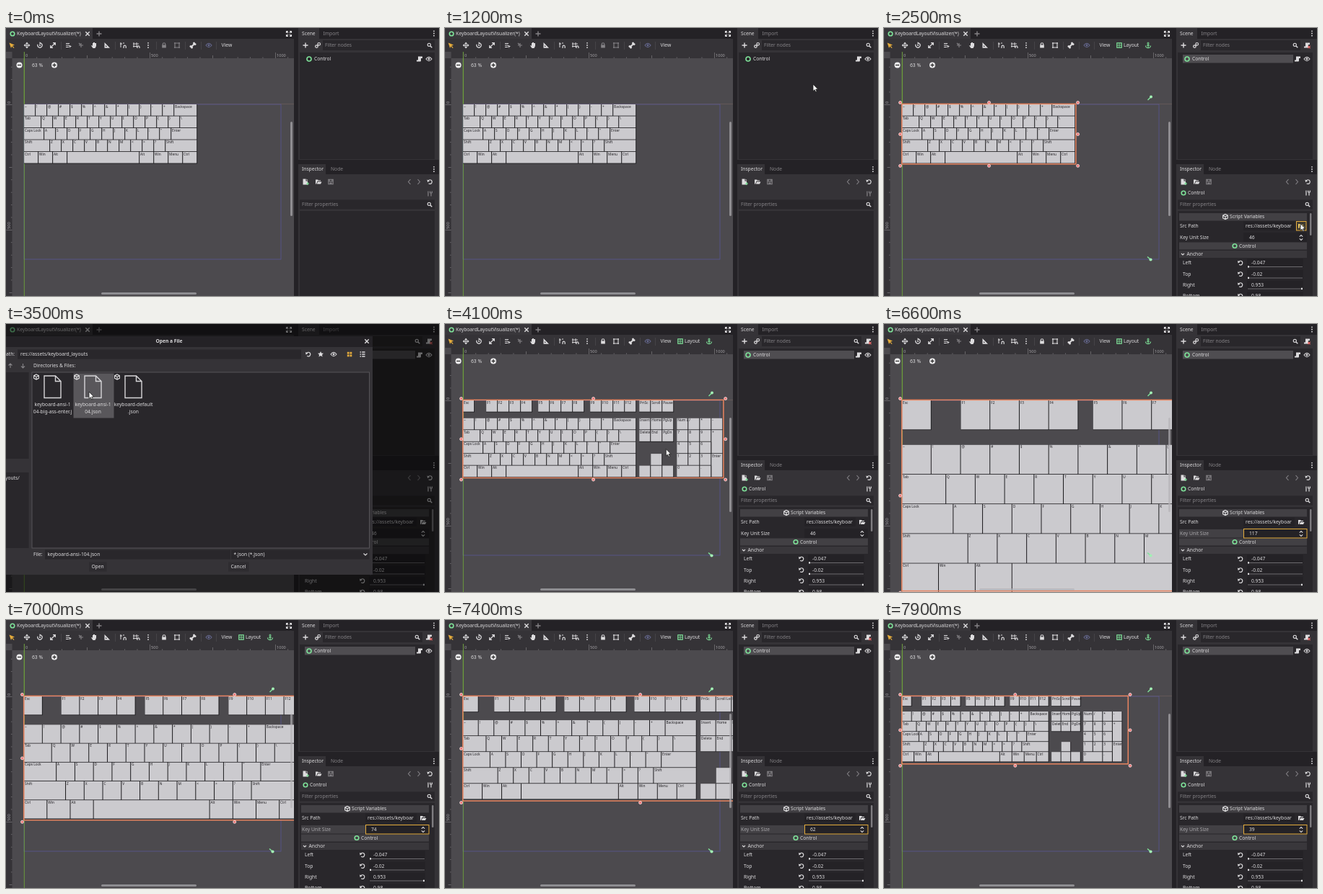
Write an HTML page that moves like this. It is 600 px wide and 372 px high and loops after 8 s.

```html
<!DOCTYPE html>
<html lang="en">
<head>
<meta charset="utf-8">
<title>Keyboard layout editor</title>
<style>
html, body { margin: 0; width: 100%; height: 100%; overflow: hidden; background: #353337; }
svg { display: block; }
text { font-family: "Noto Sans", "Open Sans", sans-serif; white-space: pre; }
</style>
</head>
<body>
<svg id="stage" width="600" height="372" viewBox="0 0 600 372"></svg>
<script>
const LOOP = 8000, STEP = 100;
const ZOOM = 0.348, OX = 25, OY = 106;
const BG = '#4c4a4e', PANEL = '#353337', DARK = '#29272b', STRIP = '#242226';
const INK = '#dddcde', DIM = '#858387', GREEN = '#7fe39a', AMBER = '#e3ab3c';

// SVG helpers
const esc = s => s.replace(/&/g, '&amp;').replace(/</g, '&lt;');
const rect = (x, y, w, h, fill, extra = '') =>
  `<rect x="${x}" y="${y}" width="${w}" height="${h}" fill="${fill}" ${extra}/>`;
const frame = (x, y, w, h, color, sw = 1) =>
  rect(x, y, w, h, 'none', `stroke="${color}" stroke-width="${sw}"`);
const text = (x, mid, s, fill = INK, extra = '', size = 6.7) =>
  `<text x="${x}" y="${mid + size * 0.36}" font-size="${size}" fill="${fill}" ${extra}>${esc(s)}</text>`;
const centered = (x, mid, s, extra = '') => text(x, mid, s, INK, 'text-anchor="middle" ' + extra);
const line = (d, color = INK, sw = 1.1, fill = 'none') =>
  `<path d="${d}" stroke="${color}" stroke-width="${sw}" fill="${fill}"/>`;
const solid = (d, color = INK) => `<path d="${d}" fill="${color}"/>`;
const dot = (x, y, r, fill, extra = '') => `<circle cx="${x}" cy="${y}" r="${r}" fill="${fill}" ${extra}/>`;
const ring = (x, y, r = 3, color = GREEN, sw = 1.6) =>
  dot(x, y, r, 'none', `stroke="${color}" stroke-width="${sw}"`);
const at = (x, y, body) => `<g transform="translate(${x} ${y})">${body}</g>`;

// Icons, centred on 0,0
const icon = {
  plus: (c = INK, r = 3.5) => line(`M${-r} 0H${r}M0 ${-r}V${r}`, c, 1.4),
  cross: (c = INK) => line('M-2.7 -2.7L2.7 2.7M2.7 -2.7L-2.7 2.7', c, 1.4),
  search: (c = INK) => ring(-.7, -.7, 2.1, c, 1.1) + line('M1 1L3.3 3.3', c, 1.4),
  eye: (c = INK) => line('M-4 0Q0 -5.5 4 0Q0 5.5 -4 0Z', c, 1.1) + dot(0, 0, 1.4, c),
  dots: (c = INK) => [-3.2, 0, 3.2].map(y => dot(0, y, .9, c)).join(''),
  script: (c = INK) => solid('M-2 -3.5H4V-1H2V2.5Q2 3.5 1 3.5H-4V1.5H-2Z', c),
  folder: (c = INK) => solid('M-4 -3H-1L0 -2H3V-1H-1.5L-3 3H-4ZM-1 0H4.5L3 3H-2.2Z', c),
  save: (c = INK) => line('M-3.2 -3.2H3.2V3.2H-3.2Z M-1.8 -3V-.5H1.8V-3', c, 1.1) + rect(-1.6, 1, 3.2, 2, c),
  newFile: () => solid('M-3.5 -4H.5V-1H3V4H-3.5Z') + solid('M1.5 -4L3.5 -2H1.5Z') + line('M1 2.5H5M3 .5V4.5', GREEN, 1.2),
  reset: (c = INK) => line('M-2.3 -1.6A2.8 2.8 0 1 1 -1.8 2.2', c, 1.2) + solid('M-4 -3L-3.4 .6L-.4 -1.2Z', c),
  tools: (c = INK) => line('M-2 -3.5V3.5M2 0V3.5M.7 -3.5V-1.5Q2 0 3.3 -1.5V-3.5', c, 1.2),
  box: (c = INK) => line('M0 -3.6L3.4 -1.8V1.8L0 3.6L-3.4 1.8V-1.8ZM-3.4 -1.8L0 0L3.4 -1.8M0 0V3.6', c, 1.1),
  lock: (c = INK) => rect(-2.8, -.5, 5.6, 4, c) + line('M-1.8 0V-1.5A1.8 1.8 0 0 1 1.8 -1.5V0', c),
  group: (c = INK) => line('M-2 -3H2M-2 3H2M-3 -2V2M3 -2V2', c) +
    [-3, 3].map(x => dot(x, -3, 1.1, c) + dot(x, 3, 1.1, c)).join(''),
  expand: () => line('M-3.5 -1V-3.5H-1M1 -3.5H3.5V-1M3.5 1V3.5H1M-1 3.5H-3.5V1M-3 -3L-1 -1M3 -3L1 -1M3 3L1 1M-3 3L-1 1'),
  spin: () => line('M-2.2 -1.4L0 -3.4L2.2 -1.4M-2.2 1.4L0 3.4L2.2 1.4', INK, 1.1)
};
const put = (name, x, y, color) => at(x, y, icon[name](color));

function toolbar() {
  const move = solid('M0 -4.5L2 -2H-2ZM0 4.5L2 2H-2ZM-4.5 0L-2 -2V2ZM4.5 0L2 -2V2Z') + line('M-3 0H3M0 -3V3');
  const hand = solid('M-2 -3H-1V-4H1V-3H3V1L1.5 4H-1.5L-4 .5L-3 0L-2 1Z');
  const list = line('M-4 -2.5H1M-4 0H0M-4 2.5H0', INK, 1.1) + solid('M0 -.5L4 1.5L2 2.2L1.5 4Z');
  const pivot = line('M-3 0H3M0 -3V3M-3 -3L-1 -1', DIM);
  const grid = line('M-3 -4V3M1 -4V3M-4 -2H4M-4 1.5H2', INK, .9) + line('M2 4V2.4A1.5 1.5 0 0 1 5 2.4V4', INK, 1.2);
  const smart = line('M-3 -4V3M-4 -2H-1M1 -4V-2', INK, 1) + line('M1 4V1.8A1.6 1.6 0 0 1 4.2 1.8V4', INK, 1.2);
  const bone = line('M-2 2L2 -2', INK, 2) + [[-3, 1.5], [-1.5, 3], [3, -1.5], [1.5, -3]].map(p => dot(...p, 1.5, INK)).join('');
  return at(8, 24, solid('M-3.5 -3.5L4 -.5L1 .7L3.5 3.2L2.6 4L.2 1.6L-1 4Z', AMBER)) +
    at(29, 24, move) +
    at(47, 24, line('M-3 -1.2A3.2 3.2 0 1 0 1 -3', INK, 1.3) + solid('M-.5 -4.8L2 -3L-.5 -1Z') + dot(0, 0, 1, INK)) +
    at(65, 24, line('M-3.3 0V3.3H0M0 -3.3H3.3V0M-3 3L3 -3', INK, 1.2)) +
    at(87, 24, list) + at(104, 24, pivot) + at(122, 24, hand) +
    at(140, 24, solid('M-3.5 -4L4 3.8H-3.5ZM-2 0V2H0Z').replace('<path', '<path fill-rule="evenodd"')) +
    at(162, 24, smart) + at(180, 24, grid) + put('dots', 197, 24) + at(259, 24, bone) +
    put('eye', 281, 24, '#65688f') +
    [76, 151, 208, 248, 270, 291].map(x => rect(x, 19, .8, 11, '#4a484c')).join('') +
    text(298.5, 24, 'View');
}

function rulers() {
  let s = rect(0, 33, 399, 9, PANEL) + rect(0, 42, 8.5, 330, PANEL) + rect(0, 33, 8.5, 9, BG);
  const unit = 50 * ZOOM;
  for (let i = -5; i < 22; i++) {
    const len = i % 10 === 0 ? 8 : i % 5 === 0 ? 4 : 1.6;
    const x = OX + i * unit, y = OY + i * unit;
    if (x > 8 && x < 399) s += rect(x, 42 - len, .7, len, '#7d7b7f');
    if (y > 42 && y < 372) s += rect(8.5 - len, y, len, .7, '#7d7b7f');
  }
  [0, 500, 1000].forEach(n => s += text(OX + 2 + n * ZOOM, 37.5, '' + n, '#a5a3a7', '', 5.6));
  [0, 500].forEach(n => s += at(4, OY - 1 + n * ZOOM, `<g transform="rotate(-90)">${text(0, 0, '' + n, '#a5a3a7', '', 5.6)}</g>`));
  return s;
}

function leftChrome() {
  return rect(0, 0, 399, 15, STRIP) + rect(0, 0, 120, 15.5, '#39373b') + rect(0, 15, 399, 18, PANEL) +
    ring(9, 8, 2.8) + text(15, 8, 'KeyboardLayoutVisualizer(*)') + put('cross', 113, 8) +
    put('plus', 129, 8, DIM) + put('expand', 392, 8) + toolbar() + rulers() +
    dot(18.5, 51.5, 4, '#efeef0') + line('M16 51.5H21', '#333', 1.3) + text(36, 51.5, '63 %') +
    dot(67, 51.5, 4, '#efeef0') + line('M64.5 51.5H69.5M67 49V54', '#333', 1.3) +
    rect(394, 130, 3, 131, '#b3b1b5', 'rx="1.5" opacity=".65"') +
    rect(132, 367, 132, 3, '#b3b1b5', 'rx="1.5" opacity=".65"');
}

function docks() {
  return rect(399, 0, 201, 372, STRIP) +
    rect(405, 0, 29, 16, PANEL) + rect(405, 15, 195, 168, PANEL) +
    text(410, 7.5, 'Scene') + text(439.5, 7.5, 'Import', DIM) + put('dots', 593, 7.5) +
    put('plus', 415, 24) +
    at(432, 24, ring(-1.6, 1.6, 1.8, INK, 1.2) + ring(1.7, -1.7, 1.8, INK, 1.2) + line('M-1 1L1 -1')) +
    rect(407, 34, 187, 148, DARK) +
    rect(405, 189, 38, 15, PANEL) + rect(405, 203, 195, 169, PANEL) +
    text(410, 196, 'Inspector') + text(450, 196, 'Node', DIM) + put('dots', 593, 196) +
    put('newFile', 415, 213.5) + put('folder', 433, 213.5) + put('save', 450, 213.5, DIM) +
    line('M560.5 210L557.5 213.5L560.5 217', DIM) + line('M570.5 210L573.5 213.5L570.5 217', DIM) +
    put('reset', 587.5, 213.5) +
    rect(407, 238.5, 187, 13, DARK) + text(410, 245, 'Filter properties', DIM) + put('search', 587, 245) +
    rect(407, 254, 187, 118, DARK);
}

const treeRow = () => ring(420, 43) + text(427, 43, 'Control') + put('script', 573, 43) + put('eye', 586, 43);

const idlePanel = () =>
  rect(439, 17, 155, 14, DARK) + text(442, 24, 'Filter nodes', DIM) + put('search', 587, 24) +
  treeRow() + put('tools', 587, 230, DIM) + put('lock', 219, 24, DIM) + put('group', 237, 24, DIM);

function activePanel() {
  const slider = (label, y, val, knob) =>
    text(414, y, label) + put('reset', 494, y) + rect(503, y - 6, 78, 13, '#242226') +
    text(509, y, val) + rect(504, y + 5, 76, 1, '#6e6c70') + rect(knob, y + 4.2, 2, 2.4, INK);
  const bar = (y, h, fill) => rect(409, y, 177, h, fill);
  return rect(439, 17, 138, 14, DARK) + text(442, 24, 'Filter nodes', DIM) + put('search', 570, 24) +
    put('script', 586, 24) + at(589, 26.5, line('M-1.6 -1.6L1.6 1.6M1.6 -1.6L-1.6 1.6', '#f06a6a', 1.3)) +
    rect(414, 37, 153, 11.5, '#4f4d51') + treeRow() +
    put('lock', 219, 24) + put('group', 237, 24) +
    at(326, 24, frame(-3.2, -3.2, 6.4, 6.4, GREEN, 1.2) + line('M-3 0H3M0 -3V3', GREEN, .8)) + text(332, 24, 'Layout') +
    at(366, 24, line('M0 -1.8V4M-3.5 .5Q-3 3.8 0 3.8Q3 3.8 3.5 .5M-2 0H2', GREEN) + ring(0, -2.8, 1.1, GREEN, 1)) +
    ring(415, 229, 2.8) + text(421, 229, 'Control') + put('tools', 587, 229) +
    bar(257, 10.5, '#424044') + put('box', 473, 262) + text(479, 262, 'Script Variables') +
    text(410, 275, 'Src Path') + rect(498, 268.5, 71, 12.5, '#242226') +
    text(501, 275, 'res://assets/keyboar') + put('folder', 578, 275) +
    bar(297.5, 10, '#424044') + ring(486, 302.5, 2.8) + text(492, 302.5, 'Control') +
    bar(309, 10, '#39373b') + line('M412 313L414 315L416 313') + text(419.5, 314, 'Anchor') +
    slider('Left', 326, '-0.047', 504) + slider('Top', 341.5, '-0.02', 504) +
    slider('Right', 356.5, '0.953', 578) + slider('Bottom', 372, '0.98', 578) +
    rect(590, 257, 2.5, 31, '#7d7b7f', 'rx="1.2"');
}

const unitField = (value, editing) =>
  (editing ? rect(409, 285, 89, 11.5, '#424044') : '') + text(410, 291, 'Key Unit Size', editing ? '#a9a7ab' : INK) +
  rect(498, 284, 88, 13, '#242226') + text(506, 291, '' + value) + put('spin', 578, 291) +
  (editing ? frame(498.5, 284.5, 87.5, 12.5, AMBER) : '');

// Keyboard layouts as [x, y, w, h, label]
function row(keys, x, y, label, w = 1) {
  label.split(' ').forEach(k => {
    const [name, width] = k.split('|');
    keys.push([x, y, +width || w, 1, name.replace('_', ' ')]);
    x += +width || w;
  });
}
function mainBlock(y) {
  const keys = [];
  row(keys, 0, y, '~ ! @ # $ % ^ & * ( ) - + Backspace|2');
  row(keys, 0, y + 1, 'Tab|1.5 Q W E R T Y U I O P { } \\|1.5');
  row(keys, 0, y + 2, 'Caps_Lock|1.75 A S D F G H J K L : " Enter|2.25');
  row(keys, 0, y + 3, 'Shift|2.25 Z X C V B N M < > ? Shift|2.75');
  row(keys, 0, y + 4, 'Ctrl Win Alt _|6.25 Alt Win Menu Ctrl', 1.25);
  return keys;
}
function fullBoard() {
  const keys = [];
  row(keys, 0, 0, 'Esc');
  [[2, 1], [6.5, 5], [11, 9]].forEach(([x, n]) =>
    row(keys, x, 0, [0, 1, 2, 3].map(i => 'F' + (n + i)).join(' ')));
  row(keys, 15.25, 0, 'PrtSc Scroll_Lock Pause');
  keys.push(...mainBlock(1.5));
  row(keys, 15.25, 1.5, 'Insert Home PgUp');
  row(keys, 15.25, 2.5, 'Delete End PgDn');
  row(keys, 16.25, 4.5, '_');
  row(keys, 15.25, 5.5, '_ _ _');
  row(keys, 18.5, 1.5, 'Num_Lock / * -');
  row(keys, 18.5, 2.5, '7 8 9');
  keys.push([21.5, 2.5, 1, 2, '+']);
  row(keys, 18.5, 3.5, '4 5 6');
  row(keys, 18.5, 4.5, '1 2 3');
  keys.push([21.5, 4.5, 1, 2, 'Enter']);
  row(keys, 18.5, 5.5, '0|2 .');
  return keys;
}
const boards = { small: { keys: mainBlock(0), w: 15, h: 5 }, full: { keys: fullBoard(), w: 22.5, h: 6.5 } };
const pitchX = u => u * ZOOM, pitchY = u => u * ZOOM + 0.46;

function drawKeys(board, u) {
  const px = pitchX(u), py = pitchY(u);
  return board.keys.map(([kx, ky, kw, kh, label]) => {
    const x = OX + kx * px, y = OY + ky * py, w = kw * px, h = kh * py;
    return rect(x, y, w, h, '#19181b') + rect(x + .1, y, w - 1, h - .8, '#cbcace') +
      text(x + 1, y + 3, label, '#222024', '', 4.8);
  }).join('');
}

function drawSelection(board, u) {
  const w = board.w * pitchX(u) + 1, h = board.h * pitchY(u) + .5;
  let s = frame(OX - .3, OY - .6, w, h + .6, '#e8845f', 1.5);
  for (const i of [0, 1, 2]) for (const j of [0, 1, 2]) {
    if (i === 1 && j === 1) continue;
    s += dot(OX + i * w / 2 + (i - 1) * 2.5, OY + j * h / 2 + (j - 1) * 2.5, 2, '#ee7676', 'stroke="#f4dede" stroke-width=".9"');
  }
  const pin = y => line(`M365.5 ${y + 3.5}L369 ${y}`, GREEN, 1.5) + dot(370, y - 1, 2, '#a2f0b4');
  return s + pin(96.5) + line('M365 317.5L369 321', GREEN, 1.5) + dot(369.5, 321.5, 2.1, '#a2f0b4');
}

function dialog(picked) {
  const file = (x, a, b) =>
    at(x, 87, line('M-11.5 -15H4L11.5 -7.5V15.5H-11.5ZM4 -15V-7.5H11.5', '#d6d5d8', 1.4)) +
    put('box', x - 22.5, 73.5) + centered(x, 112, a) + centered(x, 122, b);
  return rect(0, 0, 600, 372, '#000', 'opacity=".52"') +
    rect(0, 17, 508, 331, PANEL) + rect(0, 17, 508, 15, STRIP) +
    centered(226, 24, 'Open a File', 'font-weight="600"') + put('cross', 500, 24) +
    text(0, 42, 'ath:') + rect(16, 35.5, 393, 13, DARK) + text(20, 42, 'res://assets/keyboard_layouts') +
    put('reset', 419, 42) + at(436, 42, solid('M0 -4L1.2 -1.4L4 -1.2L1.9 .7L2.6 3.5L0 2L-2.6 3.5L-1.9 .7L-4 -1.2L-1.2 -1.4Z')) +
    put('eye', 454, 42) +
    at(476, 42, [-3.2, .5].map(x => rect(x, -3.2, 2.8, 2.8, AMBER) + rect(x, .5, 2.8, 2.8, AMBER)).join('')) +
    at(494, 42, line('M-3.5 -3H-2M-3.5 0H-2M-3.5 3H-2M-.8 -3H3.5M-.8 0H3.5M-.8 3H3.5', INK, 1.3)) +
    line('M6 61V55M3.5 57.5L6 55L8.5 57.5M23.5 55V61M21 58.5L23.5 61L26 58.5', DIM) +
    text(38, 58, 'Directories & Files:') +
    rect(0, 67, 31.5, 120, DARK) + rect(0, 206, 31.5, 105, DARK) + text(-1, 213.5, 'youts/') +
    rect(36, 67, 467.5, 244, DARK, 'stroke="#5a585c" stroke-width=".9"') +
    (picked ? rect(93.5, 68.5, 56, 62, '#59575b') : '') +
    file(64.5, 'keyboard-ansi-1', '04-big-ass-enter.j') +
    file(120.5, 'keyboard-ansi-1', '04.json') + file(176.5, 'keyboard-default', '.json') +
    text(38, 320, 'File:') + rect(54, 313.5, 257, 13, DARK) + rect(312, 313.5, 191.5, 13, DARK) +
    (picked ? text(57.5, 320, 'keyboard-ansi-104.json') : '') +
    text(315.5, 320, '*.json (*.json)') + line('M495.5 318.5L498 321L500.5 318.5') +
    rect(115, 330.5, 24.5, 13, '#2e2c30') + rect(308, 330.5, 28.5, 13, '#2e2c30') +
    centered(127, 337, 'Open') + centered(322, 337, 'Cancel');
}

const $ = id => document.getElementById(id);
const group = (id, body = '') => `<g id="${id}">${body}</g>`;
$('stage').innerHTML =
  `<clipPath id="view"><rect width="399" height="372"/></clipPath>` +
  rect(0, 0, 600, 372, BG) +
  rect(OX, 105.2, 374, .8, '#6a5c5a') + frame(OX, OY, 356, 215, '#58558c', .9) +
  rect(OX - .2, 33, 1, 339, '#6b9c3c') +
  `<g clip-path="url(#view)">${group('keys')}${group('outline')}${leftChrome()}</g>` +
  rect(OX - .2, 33, 1, 72, '#6b9c3c') + docks() + group('idle', idlePanel()) +
  group('active', activePanel() + group('field')) +
  group('focus', rect(571.5, 268.5, 13.5, 12.5, '#3f3a30', `stroke="${AMBER}" stroke-width="1"`) + put('folder', 578, 275, '#eccb6a')) +
  group('dialog') +
  group('cursor', '<path d="M0 0V9.6L2.2 7.7L3.7 11L5.2 10.3L3.8 7.1H6.8Z" fill="#fff" stroke="#1a1a1a" stroke-width=".8"/>');

// Timeline: [ms, values...]
const SELECT = 1500, OPEN = 2600, PICK = 3300, CLOSE = 3800, DRAG = 6100;
const pointer = [[900, 598, 150], [1200, 510, 78], [1500, 440, 41], [1700, 440, 41], [2000, 498, 148],
  [2400, 577, 271.5], [2700, 577, 271.5], [3000, 330, 180], [3300, 120, 96], [3400, 115, 94], [3800, 115, 94],
  [4200, 370, 200], [4600, 570, 266], [4900, 577, 274], [5100, 577, 274], [5400, 543, 292], [5600, 541, 287]];
const units = [[DRAG, 46], [6200, 52], [6300, 68], [6400, 90], [6500, 109], [6600, 117], [6700, 100], [6800, 85],
  [6900, 76], [7000, 74], [7400, 62], [7900, 39]];

function sample(track, t, col = 1) {
  const n = track.findIndex(k => k[0] > t);
  if (n === 0) return track[0][col];
  if (n < 0) return track[track.length - 1][col];
  const a = track[n - 1], b = track[n];
  return a[col] + (b[col] - a[col]) * (t - a[0]) / (b[0] - a[0]);
}
const show = (id, on) => $(id).style.display = on ? '' : 'none';

let shown = -1;
function render(t) {
  const board = t < CLOSE ? boards.small : boards.full;
  const u = Math.round(sample(units, t));
  const selected = t >= SELECT, open = t >= OPEN && t < CLOSE;
  $('keys').innerHTML = drawKeys(board, u);
  $('outline').innerHTML = selected ? drawSelection(board, sample(units, t - 20)) : '';
  $('field').innerHTML = unitField(u, t >= DRAG);
  $('dialog').innerHTML = open ? dialog(t >= PICK) : '';
  show('idle', !selected);
  show('active', selected);
  show('focus', t >= 2400 && t < OPEN);
  show('cursor', t >= 900 && t < DRAG);
  $('cursor').setAttribute('transform', `translate(${sample(pointer, t)} ${sample(pointer, t, 2)})`);
}
function tick() {
  const t = Math.floor(performance.now() % LOOP / STEP) * STEP;
  if (t !== shown) render(shown = t);
  requestAnimationFrame(tick);
}
tick();
</script>
</body>
</html>
```
